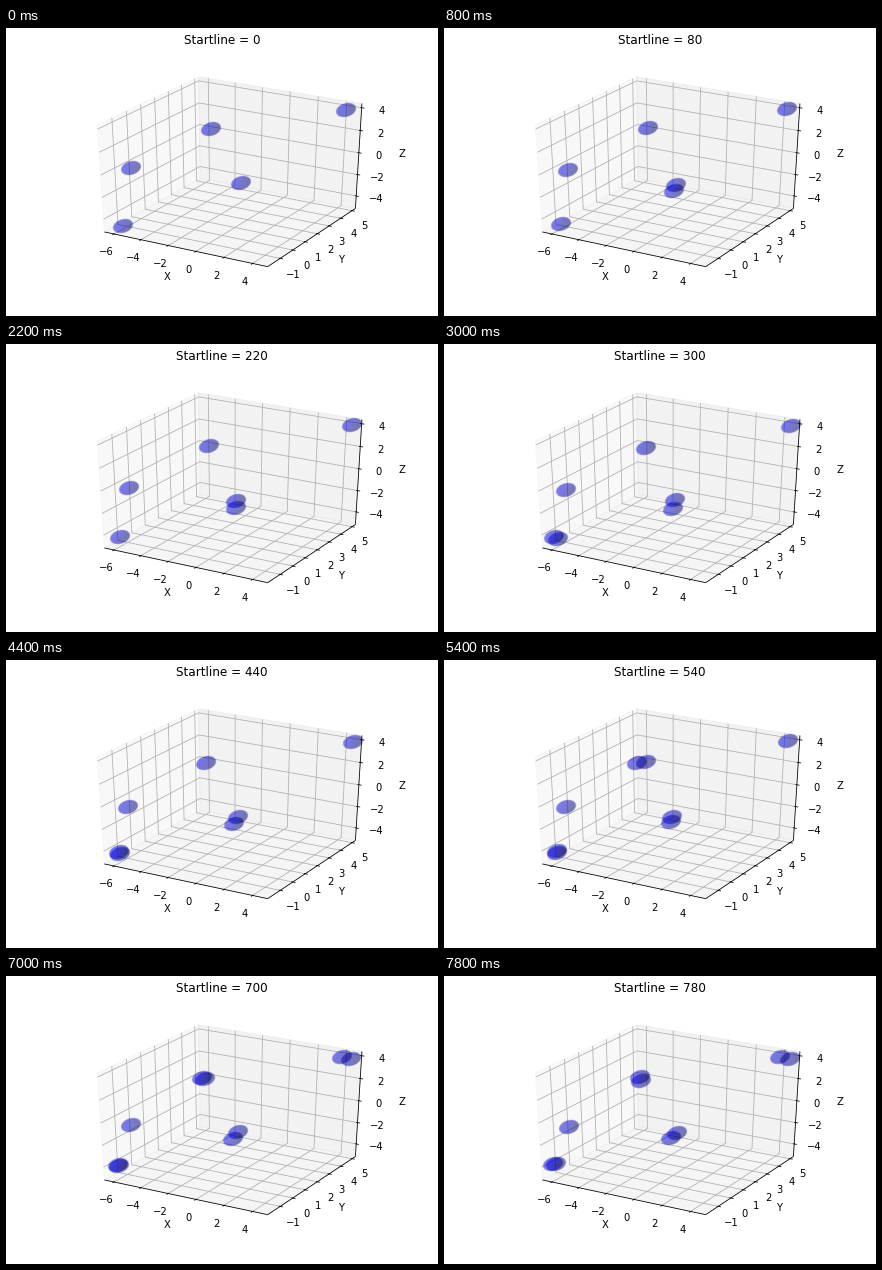
Recreate the animation shown at these times as a matplotlib script. Size 432x288 px, loop 8 s.

```python
import numpy as np
import matplotlib.pyplot as plt
from matplotlib.animation import FuncAnimation

W, H, FRAMES, STEP = 432, 288, 40, 200

# Camera: elevation 30, azimuth -60, distance 10
DIST = 10
EL, AZ = np.radians(30), np.radians(-60)
RIGHT = np.array([-np.sin(AZ), np.cos(AZ), 0])
EYE = np.array([np.cos(EL) * np.cos(AZ), np.cos(EL) * np.sin(AZ), np.sin(EL)])
UP = np.cross(EYE, RIGHT)
SX, SY = W * 0.775 / 0.185, H * 0.755 / 0.185
CX = W * 0.125 + 0.095 * SX
CY = H * 0.875 - 0.095 * SY

# Position of zero and length of one data unit inside the unit cube
ZERO = np.array([0.0745, -0.2388, 0.045])
UNIT = np.array([0.0885, 0.1433, 0.109])
TICKS = [range(-6, 5, 2), range(-1, 6), range(-4, 5, 2)]
E = 0.5 + 1 / 48           # half edge of the panes
DELTA = 1 / 12
PER_POINT = 48 / (W * 0.775 + H * 0.755)
RADIUS = 0.52

# Sphere centres at the last keys: (first frame shown, xs, ys)
KEYS = [0, 7, 15, 22, 27, 31, 39]
TRACKS = [
    (0, [205, 203, 202, 200, 202, 201, 197],
        [101, 100, 104, 103, 102, 102, 105]),
    (24, [193, 195, 196], [103, 103, 101]),
    (0, [340, 345, 347, 347, 344, 343, 346], [82, 81, 82, 82, 81, 83, 83]),
    (34, [336], [81]),
    (0, [125, 123, 122, 122, 122, 124, 125],
        [140, 143, 146, 147, 147, 147, 151]),
    (0, [235, 229, 231, 232, 228, 230, 233],
        [155, 158, 156, 157, 157, 156, 157]),
    (4, [230, 229, 228, 227, 227, 227], [163, 165, 164, 162, 165, 162]),
    (0, [117, 117, 110, 113, 113, 114, 109],
        [198, 194, 193, 192, 191, 191, 188]),
    (13, [114, 114, 113, 113, 112], [195, 194, 193, 192, 188]),
]


def project(p):
    p = np.asarray(p, float)
    depth = DIST - p @ EYE
    return CX + SX * (p @ RIGHT) / depth, CY - SY * (p @ UP) / depth


def line(points, color, z):
    x, y = zip(*map(project, points))
    ax.plot(x, y, color=color, lw=0.8, zorder=z, solid_capstyle="butt")


def label(p, text, va):
    x, y = project(p)
    ax.text(x, y, text, size=10, ha="center", va=va, zorder=4)


def pane(axis, side, grey):
    a, b = [i for i in range(3) if i != axis]
    corners = []
    for s, t in [(-E, -E), (E, -E), (E, E), (-E, E)]:
        p = np.full(3, side)
        p[a], p[b] = s, t
        corners.append(project(p))
    ax.add_patch(plt.Polygon(corners, fc=str(grey), ec=str(grey), lw=1,
                             alpha=0.5, zorder=1))


def draw_axis(axis, name, edge, back, tick_axis, sign):
    """edge: the labelled edge; back: three points of each grid line."""
    def at(base, value):
        p = np.array(base, float)
        p[axis] = value
        return p

    away = np.sign(edge)
    away[axis] = 0
    line([at(edge, -E), at(edge, E)], "black", 3)
    label(at(edge, 0) + away * 25 * PER_POINT * DELTA, name, "center")
    for value in TICKS[axis]:
        q = ZERO[axis] + UNIT[axis] * value
        line([at(b, q) for b in back], "#b0b0b0", 2)
        p = at(edge, q)
        out = np.zeros(3)
        out[tick_axis] = sign * DELTA
        line([p - 0.1 * out, p + 0.2 * out], "black", 3)
        label(p + away * 11.5 * PER_POINT * DELTA,
              str(value).replace("-", "\u2212"), "top")


def sphere_sprite(half_w, half_h, fine=6):
    """Shaded translucent ball, squashed as the axes squash it."""
    size = RADIUS * UNIT / DIST
    proj = np.array([SX * RIGHT * size, -SY * UP * size])
    x = (np.arange(2 * half_w * fine) + 0.5) / fine - half_w
    y = (np.arange(2 * half_h * fine) + 0.5) / fine - half_h
    offset = np.stack(np.meshgrid(x, y), axis=-1)
    flat = offset @ np.linalg.pinv(proj).T
    rad = np.linalg.norm(flat, axis=-1)
    view = np.cross(proj[0], proj[1])
    view *= np.sign(view @ EYE) / np.linalg.norm(view)
    depth = np.sqrt(np.clip(1 - rad ** 2, 0, 1))
    light = np.array([-1, -1, 0.5]) / 1.5
    near = 0.65 + 0.35 * (flat @ light + depth * (view @ light))
    far = 0.65 + 0.35 * (flat @ light - depth * (view @ light))
    rgba = np.zeros(rad.shape + (4,))
    rgba[..., 2] = np.clip(0.3 * (near + 0.7 * far) / 0.51, 0, 1)
    rgba[..., 3] = 0.51 * np.clip((1 - rad) * 8 + 0.5, 0, 1)
    return rgba


fig = plt.figure(figsize=(W / 72, H / 72), dpi=72, facecolor="white")
ax = fig.add_axes([0, 0, 1, 1])
ax.axis("off")

pane(0, -E, 0.95)
pane(1, E, 0.90)
pane(2, -E, 0.925)
draw_axis(0, "X", (0, -E, -E), [(0, -E, -E), (0, E, -E), (0, E, E)], 1, -1)
draw_axis(1, "Y", (E, 0, -E), [(E, 0, -E), (-E, 0, -E), (-E, 0, E)], 0, 1)
draw_axis(2, "Z", (E, E, 0), [(-E, -E, 0), (-E, E, 0), (E, E, 0)], 0, 1)

HW, HH = 12, 9
sprite = sphere_sprite(HW, HH)
balls = [ax.imshow(sprite, aspect="auto", extent=(0, 1, 1, 0), zorder=5)
         for _ in TRACKS]
ax.set_xlim(0, W)
ax.set_ylim(H, 0)
title = fig.text(0.5, 0.98, "", size=12, ha="center", va="top")


def update(i):
    title.set_text(f"Startline = {20 * i}")
    for ball, (first, xs, ys) in zip(balls, TRACKS):
        keys = KEYS[-len(xs):]
        x, y = np.interp(i, keys, xs), np.interp(i, keys, ys)
        ball.set_visible(i >= first)
        ball.set_extent((x - HW, x + HW, y + HH, y - HH))
    return [title, *balls]


anim = FuncAnimation(fig, update, frames=FRAMES, interval=STEP,
                     init_func=lambda: update(0), repeat=True, repeat_delay=0)
plt.show()
```
